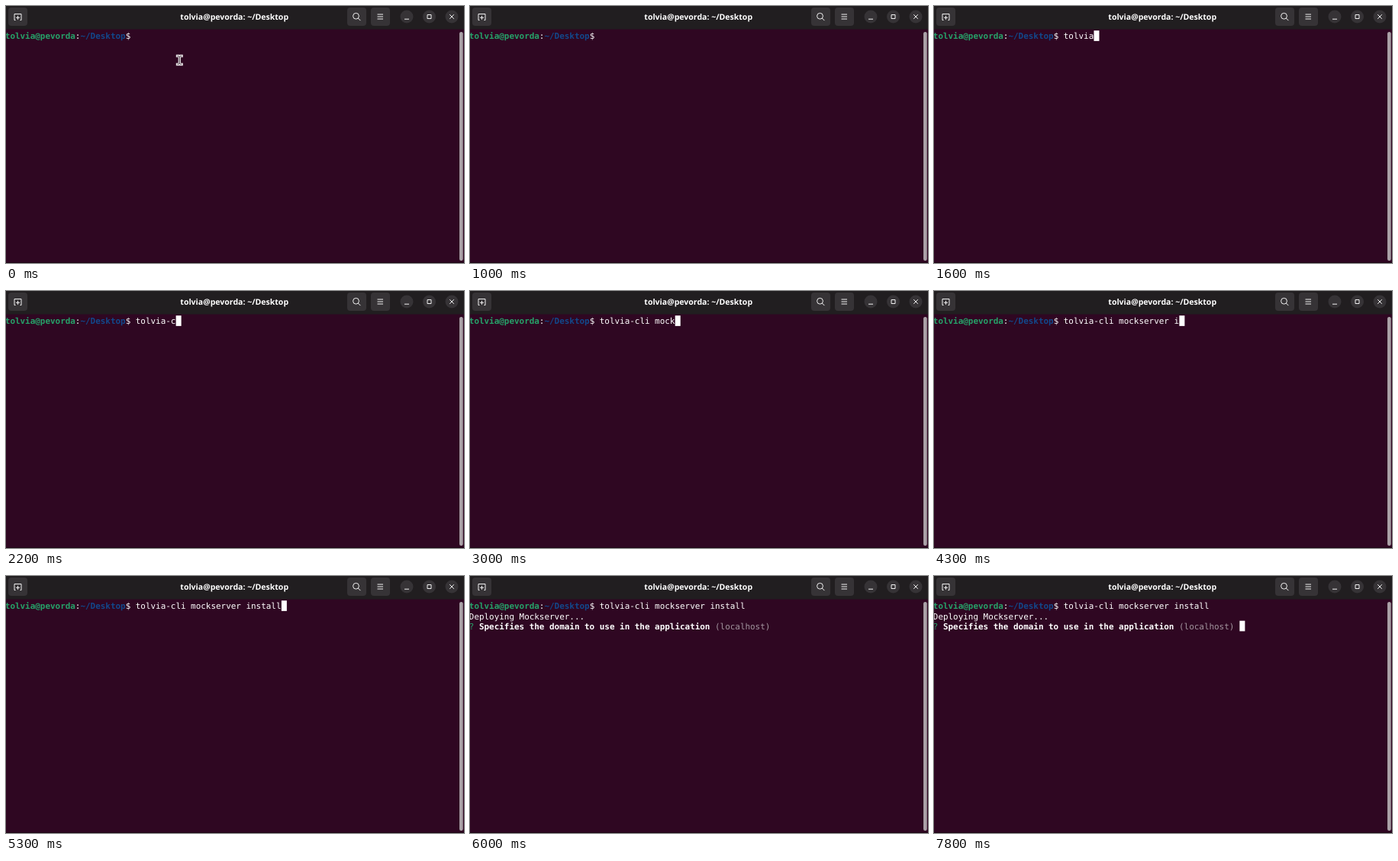
These frames come from a looping animation (600 by 337 pixels, 8000 ms). An HTML page:

```html
<!DOCTYPE html>
<html lang="en">
<head>
<meta charset="utf-8">
<title>Terminal</title>
<style>
  html, body { margin: 0; width: 100%; height: 100%; overflow: hidden; background: #2f0722; }
  svg { display: block; width: 100%; height: 100%; }
  text { white-space: pre; text-rendering: geometricPrecision; fill: #fff; }
  .term text { font: 10.935px "DejaVu Sans Mono", monospace; }
  .title { font: bold 10.54px "Open Sans", "Noto Sans", sans-serif; text-anchor: middle; }
  .term .bold { font-weight: bold; }
  .term .green { fill: #26a269; }
  .term .blue { fill: #12488b; }
  .term .dim { fill: #a3959f; }
  .button { fill: #363336; }
  .icon { fill: none; stroke: #f2f2f2; stroke-width: 1; }
</style>
</head>
<body>
<svg viewBox="0 0 600 337">
  <rect width="600" height="337" fill="#2f0722"/>
  <rect width="600" height="30.5" fill="#211e20"/>
  <rect y="336" width="600" height="1" fill="#1d0715"/>

  <g class="button">
    <rect x="3" y="2" width="25" height="24" rx="4"/>
    <rect x="447" y="2" width="25" height="24" rx="4"/>
    <rect x="478" y="2" width="25" height="24" rx="4"/>
    <circle cx="525" cy="14" r="8.5"/>
    <circle cx="554.5" cy="14" r="8.5"/>
    <circle cx="584" cy="14" r="8.5"/>
  </g>
  <g class="icon">
    <path d="M12.5 18.5H11V10.5H20V18.5H18.5M15.5 12.8V17.8M13 15.3H18"/>
    <circle cx="458.5" cy="13.2" r="3.9"/>
    <path d="M461.3 16L464.4 19.1"/>
    <path d="M486.5 11H494M486.5 14H494M486.5 17H494"/>
    <path d="M522 17.2H528M552 11.5H557V16.5H552ZM581.2 11.2L586.8 16.8M586.8 11.2L581.2 16.8"/>
  </g>
  <text class="title" x="299.2" y="17.6">tolvia@pevorda: ~/Desktop</text>

  <rect x="594" y="34" width="4.7" height="300" rx="2.2" fill="#aaa1a7"/>

  <g class="term">
    <text x="-1.2" y="43.4"><tspan class="bold green">tolvia@pevorda</tspan>:<tspan class="bold blue">~/Desktop</tspan>$ <tspan id="command"></tspan></text>
    <text id="status" x="-1.2" y="56.6">Deploying Mockserver...</text>
    <text id="question" x="-1.2" y="69.9"><tspan class="green">?</tspan> <tspan class="bold">Specifies the domain to use in the application</tspan> <tspan class="dim">(localhost)</tspan></text>
    <rect id="cursor" width="7" height="13.7" fill="#fff"/>
  </g>

  <g id="pointer" fill="none" stroke-linecap="square">
    <path d="M224.5 65.5H226.3L227.3 66.5L228.3 65.5H230.1M227.3 66.5V75.5M224.5 76.5H226.3L227.3 75.5L228.3 76.5H230.1" stroke="#e4dfe2" stroke-width="3.4"/>
    <path d="M225 65.8H226.3L227.3 66.8L228.3 65.8H229.6M227.3 66.8V75.2M225 76.2H226.3L227.3 75.2L228.3 76.2H229.6" stroke="#4a3b45" stroke-width="1"/>
  </g>
</svg>
<script>
const LOOP = 8000, CELL = 6.583, LINE = 13.25, PROMPT_COLUMNS = 26;
const COMMAND = "tolvia-cli mockserver install";
const ENTER = 5400, STATUS = 5700, QUESTION = 6000, BLINK = 600;

// [time in ms, characters typed]
const keys = [
  [1300, 1], [1400, 3], [1500, 4], [1600, 6], [2000, 7], [2200, 8],
  [2500, 9], [2600, 10], [2700, 11], [2800, 12], [2900, 13], [3000, 15],
  [3200, 16], [3500, 17], [3600, 18], [3700, 19], [3800, 20], [4000, 21],
  [4100, 22], [4300, 23], [4500, 24], [4700, 25], [4800, 26], [5000, 27],
  [5100, 28], [5300, 29]
];

const el = id => document.getElementById(id);
const [command, status, question, cursor, pointer] =
  ["command", "status", "question", "cursor", "pointer"].map(el);
const show = (node, visible) => node.setAttribute("visibility", visible ? "visible" : "hidden");

function typedAt(t) {
  let count = 0;
  for (const [time, length] of keys) if (t >= time) count = length;
  return count;
}

function cursorAt(t, typed) {
  if (t < ENTER) return { column: PROMPT_COLUMNS + typed, row: 0, on: t >= 500 && (t < 1000 || t >= 1300) };
  if (t < STATUS) return { column: 0, row: 1, on: true };
  if (t < QUESTION) return { column: 0, row: 2, on: true };
  return { column: 61, row: 2, on: Math.floor((t - QUESTION) / BLINK) % 2 === 1 };
}

function draw(now) {
  const t = now % LOOP;
  const typed = typedAt(t);
  const { column, row, on } = cursorAt(t, typed);
  command.textContent = COMMAND.slice(0, typed);
  show(status, t >= STATUS);
  show(question, t >= QUESTION);
  show(pointer, t < 300);
  show(cursor, on);
  cursor.setAttribute("x", -1.2 + column * CELL);
  cursor.setAttribute("y", 32.2 + row * LINE);
  requestAnimationFrame(draw);
}

draw(0);
</script>
</body>
</html>
```
